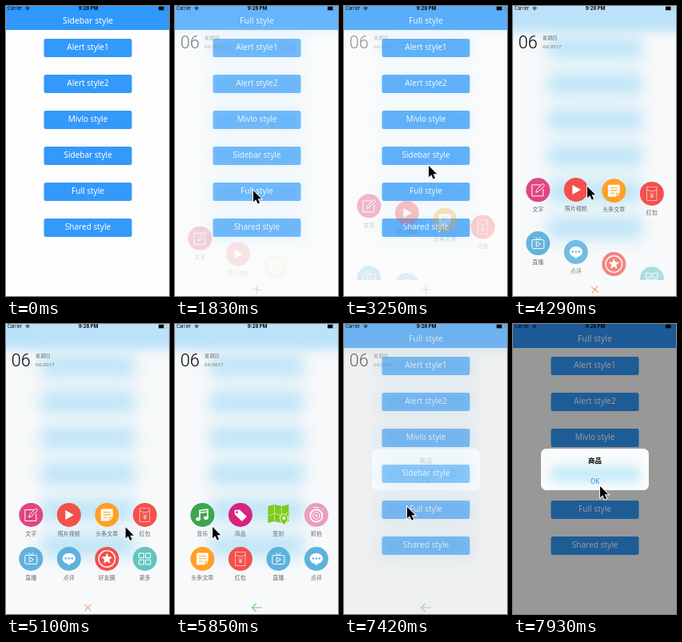
An HTML page for the animation above (7990 ms loop, 204x363 px).

```html
<!DOCTYPE html>
<html lang="en">
<head>
<meta charset="utf-8">
<title>Popup styles</title>
<style>
  html, body { margin: 0; width: 100%; height: 100%; overflow: hidden; background: #fdfdfd; }
  svg { display: block; width: 100vw; height: 100vh; }
  text { font-family: "Noto Sans", "Noto Sans CJK SC", "Noto Sans CJK", sans-serif; }
  .mid { text-anchor: middle; }
  .light { fill: #fff; font-size: 10px; }
  .label { fill: #666; font-size: 7px; }
  .date { fill: #777; font: 6.2px Roboto, "Noto Sans CJK SC", "Noto Sans CJK", sans-serif; }
  .status { font: 5.5px Inter, sans-serif; }
  .line { fill: none; stroke: #fff; stroke-width: 1; stroke-linejoin: round; stroke-linecap: round; }
  .thin { stroke-width: .7; stroke-opacity: .85; }
  .thick { stroke-width: 1.7; }
  .solid { fill: #fff; }
</style>
</head>
<body>
<svg viewBox="0 0 204 363">
  <defs>
    <clipPath id="scrollArea"><rect width="204" height="343"/></clipPath>
    <clipPath id="alertArea"><rect x="35" y="156" width="135" height="52" rx="6.5"/></clipPath>
  </defs>

  <rect width="204" height="363" fill="#fdfdfd"/>
  <rect width="204" height="30" fill="#3098fc"/>
  <text id="title" class="mid light" x="102.5" y="21.5" style="font-size:10.5px"></text>
  <g id="buttons"></g>

  <g id="blur">
    <rect width="204" height="363" fill="#f7f9fa"/>
    <rect x="-30" y="-30" width="264" height="62" fill="#bbe2f8" style="filter:blur(6px)"/>
    <g id="glow" fill="#c0e5f7" style="filter:blur(9px)"></g>
  </g>

  <g id="menu">
    <text x="6.8" y="53.2" style="font:300 21.5px Roboto,sans-serif">06</text>
    <text class="date" x="37" y="42.3">星期四</text>
    <text class="date" x="37" y="53">04/2017</text>
    <g clip-path="url(#scrollArea)"><g id="pages"></g></g>
    <path id="plus" d="M-5.5 0H5.5M0 -5.5V5.5" stroke="#f2a273" stroke-width="1.2"/>
    <path id="back" d="M109 355H96.5M101.5 350L96.5 355L101.5 360" fill="none" stroke="#72cf72" stroke-width="1.2"/>
  </g>

  <g id="alert">
    <rect width="204" height="363" fill="#000" opacity=".4"/>
    <g clip-path="url(#alertArea)">
      <rect x="35" y="156" width="135" height="52" fill="#f9fbfc"/>
      <rect x="48" y="178" width="110" height="20" fill="#c6ecf9" style="filter:blur(6px)"/>
    </g>
    <text class="mid" x="102.5" y="174" font-size="8.5" font-weight="700">商品</text>
    <text class="mid" x="102.5" y="200.3" font-size="8" fill="#1b8ff2">OK</text>
  </g>

  <text class="status" x="2" y="5.2">Carrier</text>
  <path d="M24.3 2.6Q27 .2 29.7 2.6M25.5 4Q27 2.6 28.5 4" fill="none" stroke="#000" stroke-width=".9"/>
  <rect x="191" y=".8" width="11" height="4.4" rx=".8" fill="none" stroke="#000" stroke-opacity=".3" stroke-width=".4"/>
  <path d="M26.2 4.8L27 5.6L27.8 4.8L27 4.2ZM191 .8H197.5V5.2H191Z"/>
  <text class="status mid" x="103" y="5.2" style="font-size:6px;font-weight:700">9:28 PM</text>

  <path id="cursor" d="M0 0V14.2L3.2 11.2L5.7 16.6L8.1 15.5L5.6 10.3H10.2Z" stroke="#fff" stroke-width="1.8" paint-order="stroke"/>
</svg>

<script>
const LOOP = 7990, PAGE = 204;
const $ = id => document.getElementById(id);
const clamp = p => Math.min(1, Math.max(0, p));
const smooth = p => (p = clamp(p), p * p * (3 - 2 * p));
const line = (d, weight = "") => `<path class="line ${weight}" d="${d}"/>`;
const solid = d => `<path class="solid" d="${d}"/>`;

// Icons are drawn around (0, 0).
const dots = color => [-4, 0, 4].map(x => `<circle cx="${x}" cy="-.5" r="1.3" fill="${color}"/>`).join("");
const starPoints = Array.from({ length: 10 }, (_, i) => {
  const r = i % 2 ? 3.2 : 7.2, a = i * Math.PI / 5;
  return `${(r * Math.sin(a)).toFixed(2)} ${(-r * Math.cos(a)).toFixed(2)}`;
}).join("L");

const icons = {
  edit: line("M3 -6.5H-7.5V7.5H6.5V-1M-2.5 2.5L-1.7 -.5L6 -8L8.3 -5.7L.5 1.8Z"),
  play: solid("M-4.5 -6L6 0L-4.5 6Z"),
  article: solid("M-6 -7.5H6Q7.5 -7.5 7.5 -6V3L3.5 7.5H-6Q-7.5 7.5 -7.5 6V-6Q-7.5 -7.5 -6 -7.5Z") +
    `<path d="M-4.5 -3.5H4.5M-4.5 -.3H4.5M-4.5 3H1M3.5 7.5V3H7.5" stroke="#ffa024" stroke-width="1.1" fill="none"/>`,
  envelope: line("M-6 -8.5H6V8.5H-6ZM-6 -5Q0 -1 6 -5M-2 -1L0 1.5L2 -1M0 1.5V5.5M-2 2H2M-2 3.8H2", "thin"),
  tv: line("M-6 -4.5H6Q7.5 -4.5 7.5 -3V5Q7.5 6.5 6 6.5H-6Q-7.5 6.5 -7.5 5V-3Q-7.5 -4.5 -6 -4.5ZM-3 -7.5L0 -4.5L3 -7.5M-1.8 -2L3 1L-1.8 4Z"),
  chat: `<ellipse class="solid" cy="-.5" rx="8.2" ry="6.7"/>` + solid("M-3 4L0 8.5L3 4Z") + dots("#5fb2dd"),
  star: `<circle class="line" r="10.3" style="stroke-width:1.4"/>` + solid(`M${starPoints}Z`),
  grid: line("M-7 -7H-1.3V-1.3H-7ZM1.3 -7H7V-1.3H1.3ZM-7 1.3H-1.3V7H-7ZM1.3 1.3H7V7H1.3Z"),
  music: line("M-3.5 5V-5.5L6.5 -7V3.5M-3.5 -2.5L6.5 -4", "thick") +
    `<ellipse class="solid" cx="-5.5" cy="5.3" rx="2.8" ry="2.2"/><ellipse class="solid" cx="4.5" cy="3.8" rx="2.8" ry="2.2"/>`,
  tag: solid("M-7.5 -6L-1 -6.5L8 2L2 8L-7 -.5Z") + `<circle cx="-4.3" cy="-3.4" r="1.4" fill="#d6247f"/>`,
  map: `<path fill="#7ccb1c" d="M-13 -11L-5 -13L4 -11L13 -13V8L4 10L-5 8L-13 10Z"/>` +
    line("M-5 -12V7M4 -10V9M-12 1L-5 -2L4 1L12 -3", "thin") +
    `<path fill="#7ccb1c" stroke="#f7f9fa" d="M7 13Q2 7 2 4A5 5 0 0 1 12 4Q12 7 7 13Z"/><circle class="solid" cx="7" cy="4" r="2"/>`,
  lens: `<circle class="line thick" cy="1" r="7.6"/><circle class="line" cy="1" r="4.2"/><circle class="solid" cy="1" r="1.4"/>` +
    line("M-3 -9.5H3M7.5 -7L8.5 -8"),
};

const article = ["头条文章", "#ffa024", "article"], envelope = ["红包", "#f4504a", "envelope"],
      live = ["直播", "#5fb2dd", "tv"], review = ["点评", "#5fb2dd", "chat"];
const pages = [
  [["文字", "#e2457f", "edit"], ["照片视频", "#f4504a", "play"], article, envelope,
   live, review, ["好友圈", "#f4504a", "star"], ["更多", "#62c4c4", "grid"]],
  [["音乐", "#3ca650", "music"], ["商品", "#d6247f", "tag"], ["签到", "none", "map"], ["抓拍", "#ea9dbf", "lens"],
   article, envelope, live, review],
];

const buttonNames = ["Alert style1", "Alert style2", "Mivlo style", "Sidebar style", "Full style", "Shared style"];
buttonNames.forEach((name, i) => {
  const y = 41 + 45 * i;
  $("buttons").innerHTML += `<rect x="47.5" y="${y}" width="110" height="23" rx="2.5" fill="#3399fa"/>
    <text class="mid light" x="102.5" y="${y + 14}">${name}</text>`;
  $("glow").innerHTML += `<rect x="43" y="${y - 3}" width="119" height="29" rx="8"/>`;
});

$("pages").innerHTML = pages.flat().map(([label, color, icon]) =>
  `<g><circle r="15" fill="${color}"/>${icons[icon]}<text class="mid label" y="26.3">${label}</text></g>`).join("");
const items = [...$("pages").children];

// Each showing of the full-screen menu, in ms.
const sessions = [
  { open: 1723, close: 3065, fade: 3065 },
  { open: 3930, close: 6885, fade: 7270 },
];

// Remaining distance (1 to 0) of a spring with damping ratio 0.6.
function spring(ms) {
  if (ms <= 0) return 1;
  const w = 0.00946 * ms;
  return Math.exp(-0.75 * w) * (Math.cos(w) + 0.75 * Math.sin(w));
}

// [time, x, y] of the pointer tip
const pointerPath = [
  [360, 178, 233], [1000, 87, 231], [1120, 91, 231], [1420, 98, 231], [2600, 98, 231], [2950, 106, 200],
  [3540, 106, 200], [3760, 93, 226], [4820, 93, 226], [5220, 165, 262], [5620, 165, 262], [5850, 47, 254],
  [6370, 77, 243], [6490, 79, 229], [7590, 79, 229], [7900, 109, 203], [LOOP, 109, 203],
];
function pointerAt(t) {
  const i = Math.max(1, pointerPath.findIndex(k => k[0] > t));
  const [t0, x0, y0] = pointerPath[i - 1], [t1, x1, y1] = pointerPath[i];
  const p = smooth((t - t0) / (t1 - t0));
  return [x0 + (x1 - x0) * p, y0 + (y1 - y0) * p];
}

function place(el, x, y, opacity = 1) {
  el.setAttribute("transform", `translate(${x.toFixed(2)} ${y.toFixed(2)})`);
  el.setAttribute("opacity", clamp(opacity));
}

function render(t) {
  $("title").textContent = t < 1768 ? "Sidebar style" : "Full style";

  const { open, close, fade } = sessions[t < 3700 ? 0 : 1];
  const shown = smooth((t - open - 40) / 160) * (1 - smooth((t - fade) / 290));
  $("blur").setAttribute("opacity", shown);
  $("menu").setAttribute("opacity", shown ** 0.7);

  const scroll = PAGE * (1 - (1 - clamp((t - 5625) / 300)) ** 3);
  items.forEach((item, n) => {
    const i = n % 8, page = n >> 3;
    const rise = spring(t - open - 35 * i);
    const fall = clamp((t - close - 20 * (8 - i)) / 220);
    place(item, 31.3 + 47.5 * (i % 4) + PAGE * page - scroll,
      239 + 55 * (i >> 2) + 96 * (rise + fall), (1 - rise) * (1 - fall));
  });

  const paged = scroll > PAGE / 2;
  const angle = 45 * smooth((t - open) / 500) * (1 - smooth((t - close) / 150));
  $("plus").setAttribute("transform", `translate(102.5 355) rotate(${angle})`);
  $("plus").setAttribute("opacity", paged ? 0 : 1);
  $("back").setAttribute("opacity", paged ? 1 : 0);

  $("alert").setAttribute("opacity", smooth((t - 7380) / 200));
  place($("cursor"), ...pointerAt(t), t < 360 ? 0 : 1);
}

const start = performance.now();
function tick() {
  render((performance.now() - start) % LOOP);
  requestAnimationFrame(tick);
}
tick();
</script>
</body>
</html>
```
